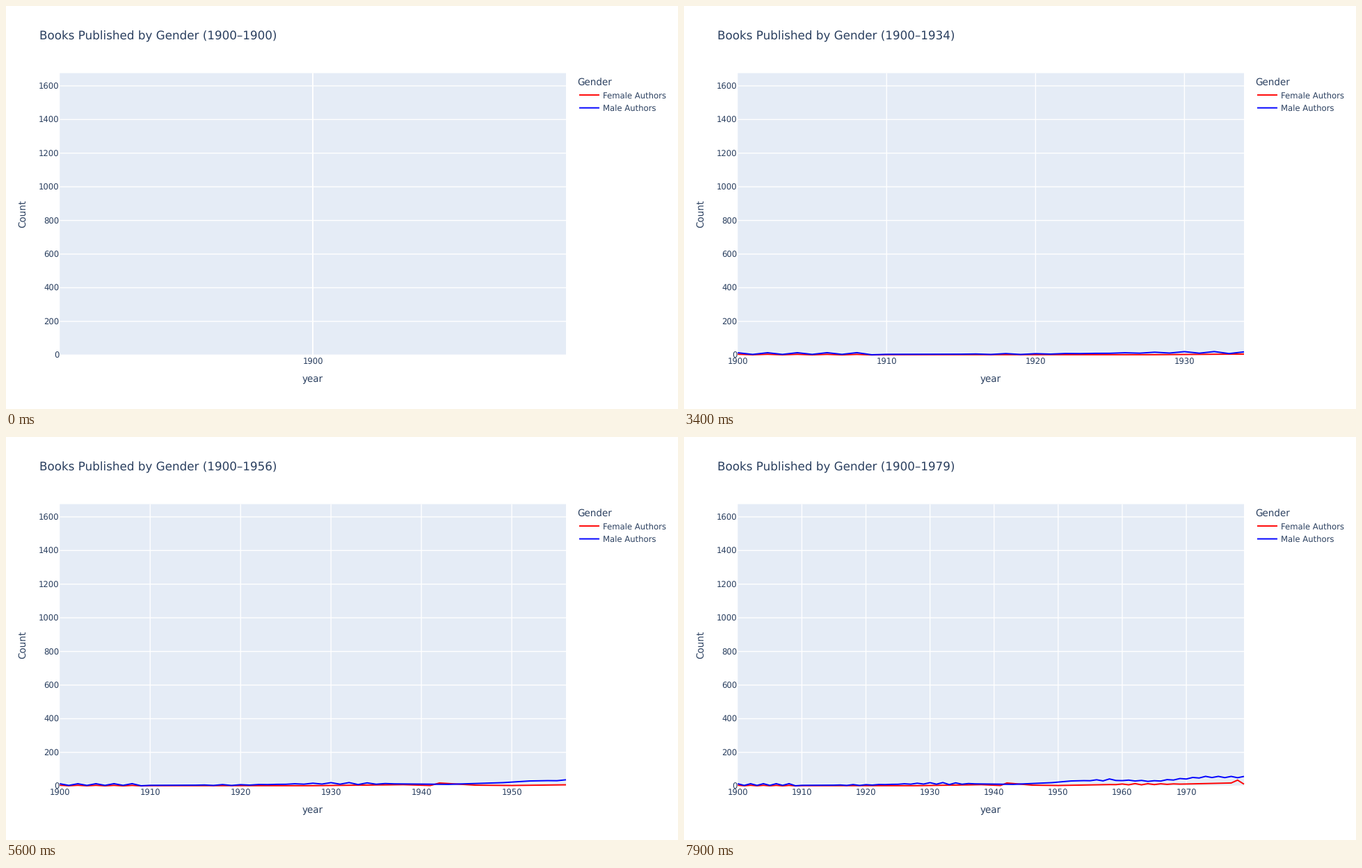
Write a matplotlib script that moves like this. It is 966 px wide and 580 px high and loops after 8 s.

```python
import matplotlib.pyplot as plt
import numpy as np
from matplotlib.animation import FuncAnimation
from matplotlib.patches import Rectangle

W, H, DPI = 966, 580, 100
PT = 72 / DPI                                  # points per pixel
LEFT, RIGHT, TOP, BOTTOM = 77.3, 805, 96.6, 502.3
UNIT = 0.2421                                  # pixels per book
START, YEARS = 1900, 80
INK, PANEL = "#2a3f5f", "#e5ecf6"
TICK, LABEL, TITLE = 11.6, 13.5, 16.7
GRID, CURVE = 1.4, 1.93

plt.rcParams["font.family"] = "DejaVu Sans"
plt.rcParams["text.hinting"] = "none"

fig = plt.figure(figsize=(W / DPI, H / DPI), dpi=DPI, facecolor="white")
ax = fig.add_axes([0, 0, 1, 1])
ax.set_xlim(0, W)
ax.set_ylim(H, 0)
ax.axis("off")


def text(x, y, s, size, ha="left", **kw):
    return ax.text(x, y, s, fontsize=size * PT, color=INK, ha=ha,
                   va="baseline", zorder=5, **kw)


def line(xs, ys, color, width, z):
    return ax.plot(xs, ys, color=color, lw=width * PT, zorder=z, snap=False,
                   solid_capstyle="butt", solid_joinstyle="miter")[0]


def y_pos(count):
    return BOTTOM - count * UNIT


def x_pos(i, last):
    if last == 0:
        return (LEFT + RIGHT) / 2
    return LEFT + (RIGHT - LEFT) * i / last


def counts(trend, swing):
    """Trend through key points plus a swing between even and odd years."""
    i = np.arange(YEARS)
    wave = np.where(i % 2, -1, 1) * np.interp(i, *zip(*swing))
    return np.maximum(np.interp(i, *zip(*trend)) + wave, 0)


male = counts(
    trend=[(0, 8.5), (8, 9), (10, 4), (20, 6), (30, 16), (43, 10), (49, 20),
           (52, 30), (58, 36), (65, 29), (73, 54), (79, 53)],
    swing=[(0, 5), (9, 5), (10, 0), (15, 0), (18, 3), (24, 0), (33, 6),
           (37, 0), (54, 0), (58, 6), (60, -2), (79, -4)])
female = counts(
    trend=[(0, 3), (10, 2), (28, 2), (38, 8), (41, 3), (42, 18), (46, 5),
           (50, 3), (60, 10), (70, 12), (77, 18), (78, 35), (79, 11)],
    swing=[(0, 1.5), (9, 1.5), (10, 0), (58, 0), (62, 4), (70, 0)])

ax.add_patch(Rectangle((LEFT, TOP), RIGHT - LEFT, BOTTOM - TOP,
                       fc=PANEL, lw=0, zorder=1, snap=False))

for count in range(0, 1601, 200):
    y = y_pos(count)
    line([LEFT, RIGHT], [y, y], "white", GRID, 2)
    text(76.4, y + 4.8, str(count), TICK, "right")

title = text(48.3, 48.3, "", TITLE)
text((LEFT + RIGHT) / 2, 541.4, "year", LABEL, "center")
text(28.4, 299.4, "Count", LABEL, "center",
     rotation=90, rotation_mode="anchor")

text(821.3, 114, "Gender", LABEL)
series = []
for y, color, name, values in ((128.1, "red", "Female Authors", female),
                               (146.6, "blue", "Male Authors", male)):
    line([824, 853], [y, y], color, CURVE, 3)
    text(857.7, y + 4.3, name, TICK)
    series.append((line([], [], color, CURVE, 3), y_pos(values)))

ticks = [(k, line([], [], "white", GRID, 2),
          text(0, 515.8, str(START + k), TICK, "center"))
         for k in range(0, YEARS, 10)]


def draw(last):
    title.set_text(f"Books Published by Gender ({START}–{START + last})")
    for k, grid, label in ticks:
        x = x_pos(k, last)
        grid.set_data([x, x], [TOP, BOTTOM])
        grid.set_visible(LEFT < x < RIGHT)
        label.set_x(x)
        label.set_visible(k <= last)
    xs = [x_pos(i, last) for i in range(last + 1)]
    for curve, ys in series:
        # a single point draws no line
        curve.set_data(xs, ys[:last + 1])
        curve.set_visible(last > 0)


anim = FuncAnimation(fig, draw, frames=YEARS, interval=100,
                     init_func=lambda: draw(0), repeat=True, repeat_delay=0)
plt.show()
```
